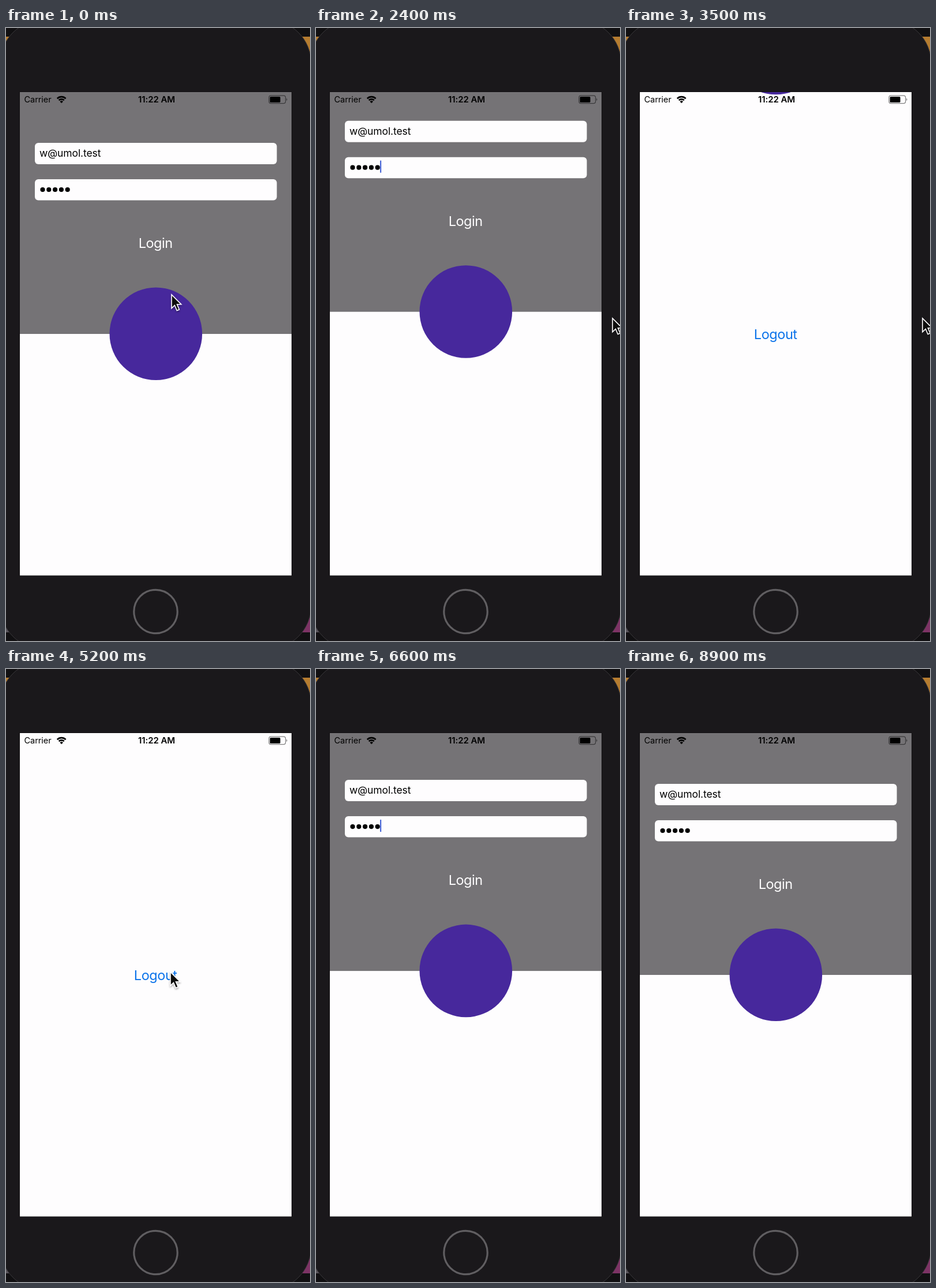
These frames come from a looping animation (527x1062 px, 9 s). An HTML page:

```html
<!DOCTYPE html>
<html lang="en">
<head>
<meta charset="utf-8">
<title>Login slide</title>
<style>
  html, body { margin: 0; width: 100%; height: 100%; overflow: hidden; background: #111012; }
  svg { display: block; width: 100%; height: 100%; }
  text { font-family: Inter, Roboto, sans-serif; }
  .button { font-size: 23.5px; letter-spacing: -.45px; text-anchor: middle; }
  .status { font-size: 15px; letter-spacing: -.1px; }
</style>
</head>
<body>
<svg viewBox="0 0 527 1062">
  <defs>
    <clipPath id="screen"><rect x="24" y="111" width="471" height="837.5"/></clipPath>
    <filter id="shadow" x="-50%" y="-50%" width="200%" height="200%">
      <feDropShadow dx="0" dy="2" stdDeviation="1.5" flood-opacity=".35"/>
    </filter>
  </defs>

  <!-- desktop behind the phone -->
  <rect width="527" height="1062" fill="#111012"/>
  <rect y="15" width="527" height="500" fill="#b57c30"/>
  <rect y="515" width="260" height="532" fill="#58545c"/>
  <rect x="260" y="515" width="267" height="532" fill="#7d3365"/>

  <!-- phone -->
  <rect x="-10" y="-14" width="539" height="1090" rx="75" fill="#1a181b" stroke="#39373a"/>
  <circle cx="259.5" cy="1011" r="37.7" fill="none" stroke="#605e61" stroke-width="3.2"/>
  <rect x="23.5" y="110.5" width="472" height="838.5" fill="#0c0b0d"/>

  <g clip-path="url(#screen)">
    <rect x="24" y="111" width="471" height="838" fill="#fefdfe"/>
    <text class="button" x="259.2" y="539" fill="#0b73ea">Logout</text>
    <g id="panel">
      <rect x="24" y="0" width="471" height="530" fill="#757376"/>
      <rect x="50" y="199" width="419.5" height="37" rx="6" fill="#fefdfe"/>
      <rect x="50" y="262" width="419.5" height="36.5" rx="6" fill="#fefdfe"/>
      <text x="58" y="223" font-size="17.5" letter-spacing="-.1">w@umol.test</text>
      <path d="M63.5 280h43.4" stroke="#000" stroke-width="8.2" stroke-linecap="round" stroke-dasharray="0 10.8"/>
      <rect id="caret" x="111" y="268" width="2.2" height="21" fill="#4a67d6"/>
      <text class="button" x="259.2" y="381" fill="#fefdfe">Login</text>
      <circle cx="259.8" cy="529.8" r="80.3" fill="#47289c"/>
    </g>

    <!-- status bar -->
    <text class="status" x="31.5" y="129" style="font-size:14.6px">Carrier</text>
    <g fill="none" stroke="#000" stroke-width="2.7">
      <path d="M88.8 122.2a10.6 10.6 0 0 1 14.8 0M91.7 125.2a6.4 6.4 0 0 1 9 0"/>
      <path d="M96.2 130.2l-2.7-2.8a3.8 3.8 0 0 1 5.4 0z" fill="#000" stroke="none"/>
    </g>
    <text class="status" x="261" y="129" font-weight="600" text-anchor="middle">11:22 AM</text>
    <rect x="455.8" y="117.2" width="28.8" height="13.4" rx="3.4" fill="none" stroke="#000" stroke-opacity=".5" stroke-width="1.2"/>
    <rect x="457.5" y="119" width="18" height="10" rx="1.5"/>
    <path d="M486.2 121.6q2.4 2.3 0 4.6z" fill-opacity=".6"/>
  </g>

  <g id="cursor">
    <path d="M0 0V23.5L5.4 18.3 9.3 27.5 13.3 25.8 9.5 16.8H16.7Z" fill="#0a0a0a"
      stroke="#fefdfe" stroke-width="1.6" stroke-linejoin="miter" filter="url(#shadow)"/>
  </g>
</svg>

<script>
  const LOOP = 9000, HIDDEN_Y = -500;
  const start = document.timeline.currentTime || 0;

  // Each step: [time, properties, easing towards the next step]
  function play(id, steps) {
    const frames = steps.map(([time, props, easing = 'linear']) =>
      ({ offset: time / LOOP, easing, ...props }));
    const run = document.getElementById(id)
      .animate(frames, { duration: LOOP, iterations: Infinity });
    run.startTime = start;
  }

  const at = (x, y) => ({ transform: `translate(${x}px, ${y}px)` });
  const show = on => ({ opacity: on ? 1 : 0 });
  const ease = 'ease-in-out', hold = 'step-end';

  play('panel', [
    [0, at(0, 0)],
    [2110, at(0, 0), ease],
    [3610, at(0, HIDDEN_Y)],
    [5227, at(0, HIDDEN_Y), ease],
    [6727, at(0, 0)],
    [LOOP, at(0, 0)]
  ]);

  play('cursor', [
    [0, at(287, 462), ease],
    [350, at(272, 378)],
    [600, at(272, 378), ease],
    [950, at(514, 503)],
    [4250, at(514, 503), ease],
    [4800, at(285, 525)],
    [5280, at(285, 525), ease],
    [6050, at(395, 546)],
    [LOOP, at(395, 546)]
  ]);
  play('cursor', [
    [0, show(true), hold],
    [6600, show(false), hold],
    [LOOP, show(false)]
  ]);

  // Caret blinks once a second
  const blink = [[0, show(false), hold]];
  for (let t = 1200; t < LOOP; t += 1000)
    blink.push([t, show(true), hold], [t + 600, show(false), hold]);
  play('caret', [...blink, [LOOP, show(false)]]);
</script>
</body>
</html>
```
